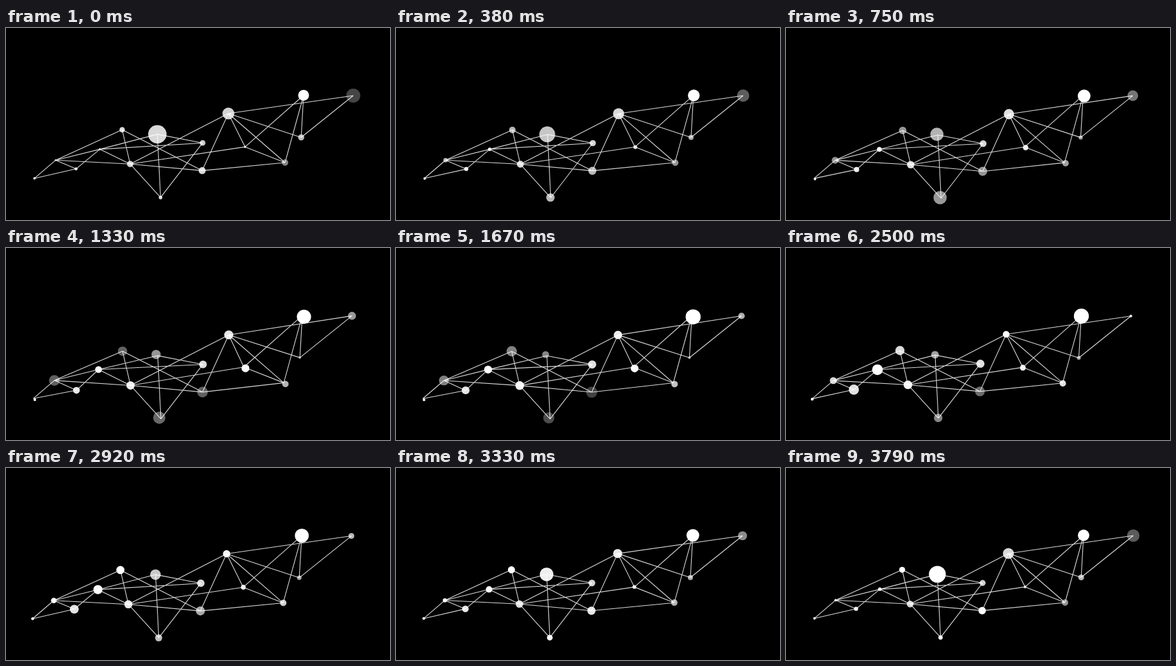
Animation, 600 px wide and 301 px high, one loop 3830 ms. Source, as an HTML page with a canvas:

```html
<!DOCTYPE html>
<html lang="en">
<head>
<meta charset="utf-8">
<title>Drifting network</title>
<style>
  html, body { margin: 0; width: 100%; height: 100%; overflow: hidden; background: #000; }
  canvas { display: block; width: 600px; height: 301px; }
</style>
</head>
<body>
<canvas id="stage"></canvas>
<script>
const W = 600, H = 301;
const LOOP = 3.83, STEPS = 92;   // the visible loop, in seconds and steps
const PULSE = 4;                 // a full pulse runs slightly past the loop
const RECOVER = 1.5;             // time a dimmed dot needs to light up again

// at: place, r: radius at rest and at the turn, turn: seconds,
// glow: opacity at rest and at the turn, dip: [lowest opacity, seconds].
const NODES = {
  A: { at: [44.5, 235.7], r: [1.9, 2.3], turn: 3, glow: [.95, 1] },
  B: { at: [77.6, 207.2], r: [1.4, 8.5], turn: 1.35, dip: [.37, 1.35] },
  C: { at: [109.5, 220.8], r: [2.4, 8.2], turn: 2.6, glow: [.93, .88] },
  D: { at: [146.6, 190.1], r: [1.7, 8.7], turn: 2.6, glow: [1, 1] },
  E: { at: [181.5, 159.5], r: [4.2, 8.5], turn: 1.85, dip: [.38, 1.35] },
  F: { at: [194, 213.2], r: [5, 7.3], turn: 2.1, glow: [.82, 1] },
  G: { at: [236.5, 166.6], r: [14.4, 3.4], turn: 2.05, dip: [.45, 2] },
  H: { at: [241.5, 265.7], r: [2.8, 10.9], turn: .8, dip: [.22, 1.9] },
  I: { at: [307.2, 180.2], r: [4.4, 6.9], turn: 2.1, glow: [.8, .9] },
  J: { at: [306.5, 223.6], r: [5.5, 8.9], turn: 1.6, dip: [.14, 2] },
  K: { at: [347.5, 134], r: [9.3, 4.9], turn: 2.65, glow: [.82, 1] },
  L: { at: [373.6, 186.4], r: [1.8, 6.5], turn: 1.45, glow: [.85, 1] },
  M: { at: [436, 211], r: [5, 5], turn: 2.6, glow: [.52, .9] },
  N: { at: [465, 105.5], r: [8.5, 12.6], turn: 2.1, glow: [1, 1] },
  O: { at: [542.6, 106], r: [11, 2.1], turn: 2.5, glow: [.27, .9] },
  R: { at: [461.2, 171.5], r: [4.8, 1.8], turn: 1.4, glow: [.72, .55] }
};
const FAR_DOTS = "BDGHOR";
const FAR_ENDS = "ABDLMNOR";
const LINES = ("AB AC BC BD BE BF CD DF DG DI EF EJ FH FJ FK FL GH GI HI " +
  "JK JM KL KM KO KR LM LN MN NR OR").split(" ");

// Drift of the two layers as [seconds, offset] points.
const NEAR_X = [[0, 0], [1.03, 1], [2.53, -3.5], [LOOP, 0]];
const NEAR_Y = [[0, 0], [1.6, 2.4], [3.4, .1], [LOOP, 0]];
const FAR_X = [[0, 0], [2.53, -3.7], [LOOP, 0]];

const canvas = document.getElementById("stage");
const ctx = canvas.getContext("2d");
const dpr = window.devicePixelRatio || 1;
canvas.width = Math.round(W * dpr);
canvas.height = Math.round(H * dpr);
ctx.scale(dpr, dpr);

const mix = (a, b, u) => a + (b - a) * u;
const ease = u => (1 - Math.cos(Math.PI * u)) / 2;

function follow(points, t) {
  const i = Math.max(1, points.findIndex(p => p[0] > t));
  const [t0, v0] = points[i - 1], [t1, v1] = points[i];
  return mix(v0, v1, ease((t - t0) / (t1 - t0)));
}

// Straight there and back again.
function swing([rest, peak], turn, t) {
  return t < turn ? mix(rest, peak, t / turn) : mix(peak, rest, (t - turn) / (PULSE - turn));
}

function opacity({ glow, dip, turn }, t) {
  if (!dip) return swing(glow, turn, t);
  const [low, at] = dip;
  return t < at ? mix(.85, low, t / at) : mix(low, 1, Math.min(1, (t - at) / RECOVER));
}

function draw(t) {
  const near = [follow(NEAR_X, t), follow(NEAR_Y, t)];
  const farX = follow(FAR_X, t), far = [farX, -.19 * farX];
  const place = (id, farSet) => {
    const [dx, dy] = farSet.includes(id) ? far : near;
    return [NODES[id].at[0] + dx, NODES[id].at[1] + dy];
  };

  ctx.globalAlpha = 1;
  ctx.fillStyle = "#000";
  ctx.fillRect(0, 0, W, H);

  ctx.strokeStyle = "#dcdcdc";
  ctx.lineWidth = 1.1;
  ctx.beginPath();
  for (const [a, b] of LINES) {
    ctx.moveTo(...place(a, FAR_ENDS));
    ctx.lineTo(...place(b, FAR_ENDS));
  }
  ctx.stroke();

  ctx.fillStyle = "#fff";
  for (const id in NODES) {
    const node = NODES[id];
    ctx.globalAlpha = opacity(node, t);
    ctx.beginPath();
    ctx.arc(...place(id, FAR_DOTS), swing(node.r, node.turn, t), 0, 2 * Math.PI);
    ctx.fill();
  }
}

let start;
function tick(now) {
  if (start === undefined) start = now;
  const t = Math.max(0, now - start) / 1000 % LOOP;
  const step = Math.min(STEPS - 1, Math.floor((t + .003) * STEPS / LOOP));
  draw(step * LOOP / STEPS);
  requestAnimationFrame(tick);
}
draw(0);
requestAnimationFrame(tick);
</script>
</body>
</html>
```
